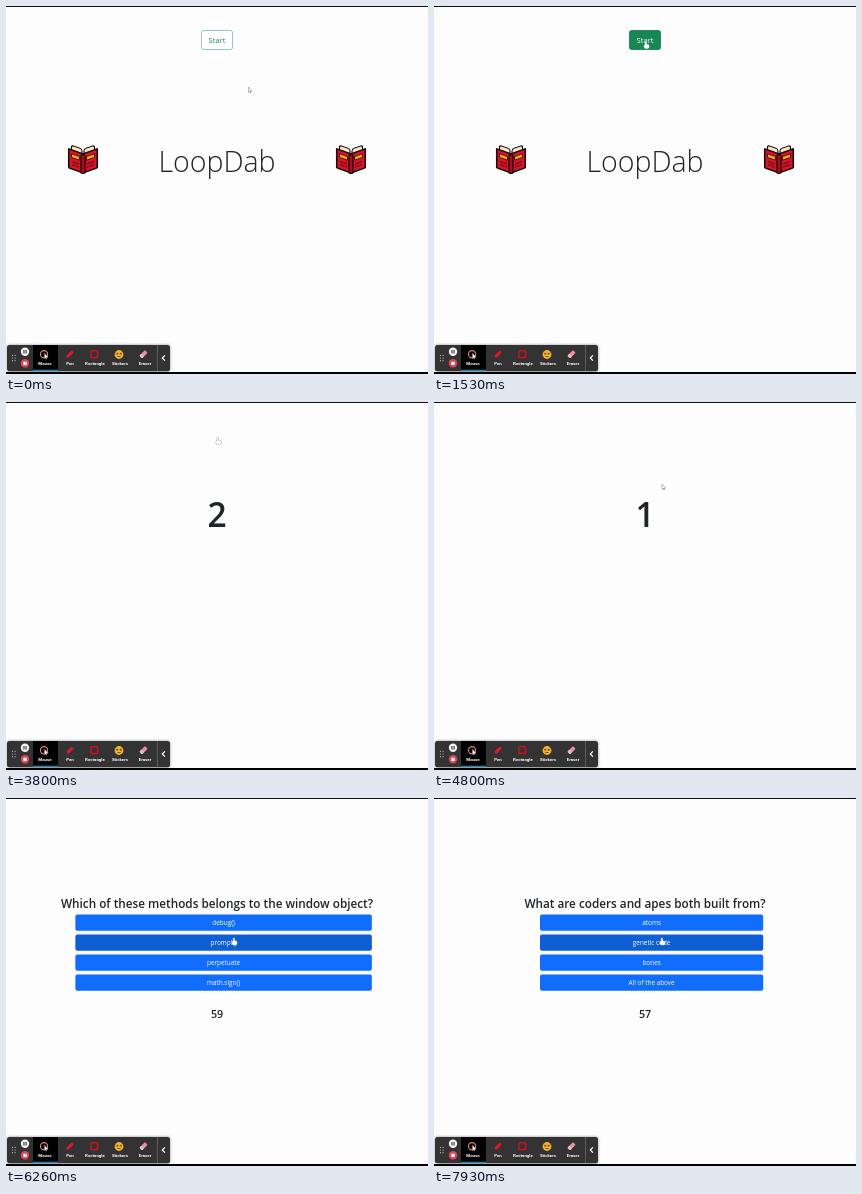
These frames come from a looping animation (422x368 px, 8000 ms). An HTML page with a canvas:

```html
<!DOCTYPE html>
<html lang="en">
<head>
<meta charset="utf-8">
<title>Quiz</title>
<style>
html, body { margin: 0; width: 100%; height: 100%; overflow: hidden; background: #fdfdfd; }
canvas { display: block; }
</style>
</head>
<body>
<canvas id="stage" width="422" height="368"></canvas>
<script>
const stage = document.getElementById('stage');
const ctx = stage.getContext('2d');
const LOOP = 8000, SECOND = 1000;
const COUNTDOWN = 1855, QUIZ = COUNTDOWN + 3 * SECOND, NEXT = 6455;
const CENTER = stage.width / 2;
const ROW_TOP = 116.5, ROW_STEP = 20, ROW_HEIGHT = 16.2;
const SANS = '"Open Sans", "Noto Sans", sans-serif';
const INK = '#212529', OUTLINE = '#140608', RED = '#d4142a';
const WHITE = [255, 255, 255], GREEN = [25, 135, 84], BLUE = [17, 109, 253], DEEP_BLUE = [14, 94, 212];

const questions = [
  {
    title: 'Which of these methods belongs to the window object?',
    answers: ['debug()', 'prompt()', 'perpetuate', 'math.sign()'],
    width: 296.5, wake: QUIZ
  },
  {
    title: 'What are coders and apes both built from?',
    answers: ['atoms', 'genetic code', 'bones', 'All of the above'],
    width: 223.2, wake: 7260
  }
];

const home = { x: 244, y: 84 };
const moves = [
  { start: 130, end: 1100, x: 198, y: 37 },
  { start: 1130, end: 1530, x: 212.5, y: 39 },
  { start: 3800, end: 3930, x: 212, y: 48 },
  { start: 4530, end: 4800, x: 229.5, y: 85 },
  { start: 4800, end: 5330, x: 237.5, y: 123 },
  { start: 5400, end: 5900, x: 228.5, y: 143.5 }
];

const clamp = v => Math.max(0, Math.min(1, v));
const smooth = u => u * u * (3 - 2 * u);
const progress = (t, start, end) => clamp((t - start) / (end - start));
const fade = (t, start) => progress(t, start, start + 150);
const mix = (a, b, k) => `rgb(${a.map((v, i) => Math.round(v + (b[i] - v) * k))})`;

function cursorAt(t) {
  return moves.reduce((p, m) => {
    const k = smooth(progress(t, m.start, m.end));
    return { x: p.x + (m.x - p.x) * k, y: p.y + (m.y - p.y) * k };
  }, home);
}

function text(str, x, y, size, weight, color, family = SANS) {
  ctx.font = `${weight} ${size}px ${family}`;
  ctx.textAlign = 'center';
  ctx.fillStyle = color;
  ctx.fillText(str, x, y);
}

function paint(fill, stroke, width = 1) {
  if (fill) { ctx.fillStyle = fill; ctx.fill(); }
  if (stroke) { ctx.strokeStyle = stroke; ctx.lineWidth = width; ctx.stroke(); }
}

function box(x, y, w, h, r, fill, stroke, width) {
  ctx.beginPath();
  ctx.roundRect(x, y, w, h, r);
  paint(fill, stroke, width);
}

const square = (size, r, ...style) => box(-size / 2, -size / 2, size, size, r, ...style);

function disc(x, y, r, ...style) {
  ctx.beginPath();
  ctx.arc(x, y, r, 0, 2 * Math.PI);
  paint(...style);
}

function at(x, y, draw, angle = 0) {
  ctx.save();
  ctx.translate(x, y);
  ctx.rotate(angle);
  draw();
  ctx.restore();
}

function book() {
  for (const side of [-1, 1]) {
    ctx.save();
    ctx.transform(side, -0.35, 0, 1, 0, 0);
    if (side > 0) ctx.transform(1, 0, 0, 1, 0, 0);
    box(1, -4.5, 10.5, 7, 2, '#f6e6c0', OUTLINE, 1.1);
    box(0, 0, 14.3, 19, 0.5, RED, OUTLINE, 1.5);
    box(3.5, 4, 8, 3.6, 0, '#f4a51c', OUTLINE, 0.7);
    for (const y of [11, 14]) box(4, y, 7, 1, 0, '#4a0a12');
    ctx.restore();
  }
  box(-2, 1, 4, 18.5, 1, '#a50f20', OUTLINE, 1.2);
}

function startButton(t) {
  const k = fade(t, 1150);
  if (t >= 1795) box(193.7, 22.7, 34.6, 22.6, 3.5, null, 'rgba(25,135,84,.4)', 2.6);
  box(195.5, 24.5, 31, 19, 2, mix(WHITE, GREEN, k), mix(WHITE, GREEN, 0.5 + k / 2), 0.9);
  text('Start', CENTER, 37, 7.6, 400, mix(GREEN, WHITE, k));
}

function titleScreen(t) {
  startButton(t);
  text('LoopDab', CENTER, 165.5, 28.5, 300, INK);
  for (const side of [-1, 1]) at(CENTER + side * 134, 147.8, book);
}

function quizScreen(t, pointer) {
  const { title, answers, width, wake } = questions[t < NEXT ? 0 : 1];
  const middle = 217.6;
  text(title, CENTER, 109.5, 11.75, 600, INK);
  answers.forEach((answer, row) => {
    const y = ROW_TOP + row * ROW_STEP;
    const distance = Math.abs(pointer.y - y - ROW_HEIGHT / 2);
    const hover = clamp((ROW_STEP / 2 - distance) / 3) * fade(t, wake);
    box(middle - width / 2, y, width, ROW_HEIGHT, 2, mix(BLUE, DEEP_BLUE, hover));
    text(answer, middle, y + 10.8, 6.4, 400, '#fff');
  });
  const left = 60 - Math.floor((t - QUIZ) / SECOND);
  if (left < 60) text(left, CENTER, 220.3, 10.7, 600, INK);
}

function arrow() {
  ctx.beginPath();
  ctx.moveTo(-1.5, -3);
  ctx.lineTo(-1.5, 2.3);
  ctx.lineTo(2.2, 0.9);
  ctx.closePath();
  paint('#fff', '#888', 0.6);
  box(0, 1, 1, 2, 0, '#888');
}

function hand() {
  for (const stroke of ['#888', null]) {
    box(-2.3, -0.6, 4.8, 4, 1.3, '#fff', stroke, 0.9);
    box(-1.4, -3.5, 1.4, 5, 0.7, '#fff', stroke, 0.9);
  }
}

// Tool icons, each drawn around its own centre
const tools = {
  Mouse() {
    disc(-1, 0, 3.6, null, '#e88078', 1.1);
    at(1, 2, arrow);
  },
  Pen() {
    at(0, 0, () => box(-4, -1.5, 8, 3, 1, '#dc1830'), -Math.PI / 4);
  },
  Rectangle() {
    at(-0.8, 0, () => square(6.8, 0.8, null, '#c8101f', 1.5));
  },
  Stickers() {
    disc(-1, 0.3, 4.4, '#f0b62c');
    for (const eye of [-2.7, 0.7]) disc(eye, -0.5, 1, '#6a4512');
    box(-2.7, 1.8, 3.4, 0.9, 0.4, '#7a4b10');
  },
  Eraser() {
    at(-1.5, 0, () => {
      box(-4, -1.9, 8, 3.8, 1, '#e98fa0');
      box(-4, -1.9, 3, 3.8, 1, '#d9c3c8');
    }, -Math.PI / 4);
  }
};

function toolbar() {
  ctx.save();
  ctx.shadowColor = 'rgba(0,0,0,.45)';
  ctx.shadowBlur = 3;
  box(1, 339, 163, 26.3, 2.5, '#333');
  ctx.restore();
  box(27, 339, 25, 26, 0, '#000');
  box(27, 363.7, 25, 1.5, 0, '#1f7fae');

  for (let i = 0; i < 6; i++) disc(6.5 + (i % 2) * 2.6, 349.3 + (i >> 1) * 2.7, 0.6, '#bbb');
  at(19, 345.8, () => {
    disc(0, 0, 4.2, '#f2f2f2');
    for (const x of [-1.6, 0.5]) box(x, -1.7, 1.1, 3.4, 0, '#333');
  });
  at(19, 357.3, () => {
    disc(0, 0, 4.2, '#e0475a');
    square(3.2, 0.5, '#fff');
  });

  Object.entries(tools).forEach(([name, icon], i) => {
    const x = 39 + 25 * i;
    at(x, 348.2, icon);
    text(name, x, 358.8, 4.4, 700, '#fff', 'Roboto, sans-serif');
  });

  box(151, 339, 0.8, 26, 0, '#666');
  at(156.3, 352, () => {
    ctx.beginPath();
    for (const y of [-2.6, 0, 2.6]) ctx.lineTo(Math.abs(y), y);
    paint(null, '#fff', 1.2);
  });
}

function render(t) {
  const pointer = cursorAt(t);
  const overStart = t >= 1070 && t < 3860;
  box(0, 0, stage.width, stage.height, 0, '#fdfdfd');
  box(0, 0, stage.width, 1, 0, '#111');
  box(0, stage.height - 2, stage.width, 2, 0, '#000');

  if (t < COUNTDOWN) titleScreen(t);
  else if (t < QUIZ) text(3 - Math.floor((t - COUNTDOWN) / SECOND), CENTER, 125, 33.5, 600, INK);
  else quizScreen(t, pointer);

  toolbar();
  at(pointer.x, pointer.y, overStart || pointer.y > ROW_TOP ? hand : arrow);
}

const begin = performance.now();
function tick() {
  render((performance.now() - begin) % LOOP);
  requestAnimationFrame(tick);
}
tick();
</script>
</body>
</html>
```
